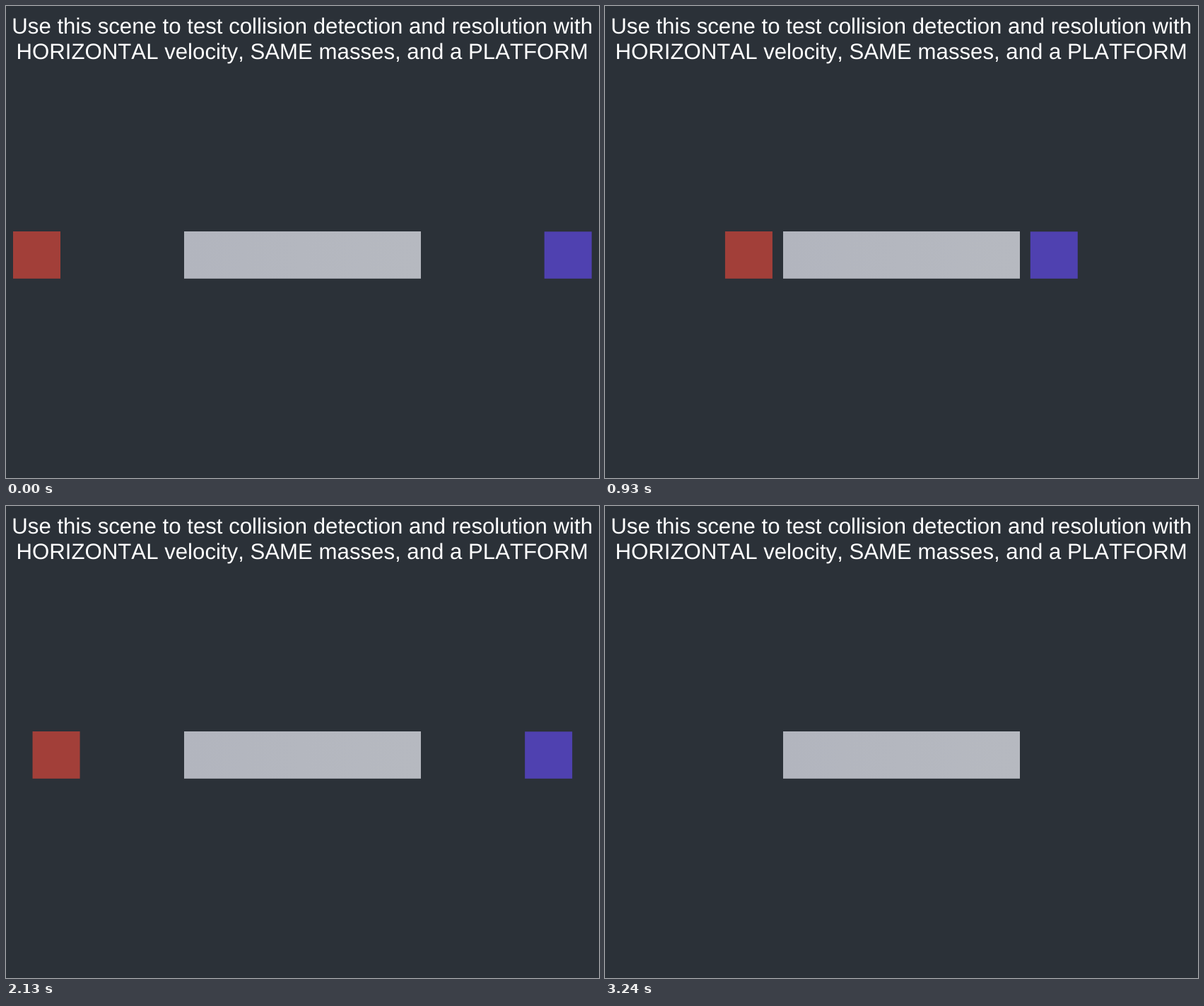
Animation of 839x668 px, one loop 3.33 s. Source, as an HTML page:

```html
<!DOCTYPE html>
<html lang="en">
<head>
<meta charset="utf-8">
<title>Collision test</title>
<style>
  html, body { margin: 0; width: 100%; height: 100%; overflow: hidden; background: #2b3138; }
  svg { display: block; width: 839px; height: 668px; }
  text {
    font: 31.2px "Liberation Sans", Arial, sans-serif;
    font-kerning: none;
    text-rendering: geometricPrecision;
    text-anchor: middle;
    fill: #fff;
  }
</style>
</head>
<body>
<svg viewBox="0 0 839 668">
  <defs>
    <linearGradient id="sheen">
      <stop offset="0" stop-color="#b2b5be"/>
      <stop offset="1" stop-color="#b6b9c0"/>
    </linearGradient>
  </defs>
  <rect width="839" height="668" fill="#2b3138"/>
  <text x="419.2" y="39.2">Use this scene to test collision detection and resolution with</text>
  <text x="419.2" y="75.2">HORIZONTAL velocity, SAME masses, and a PLATFORM</text>
  <rect x="252" y="319" width="335" height="66.8" fill="url(#sheen)"/>
  <rect id="red" y="319" width="67" height="66.8" fill="#a23f39"/>
  <rect id="blue" y="319.3" width="67" height="66.5" fill="#4f41b0"/>
</svg>
<script>
  const LOOP = 3330, STEP = 30;
  const SIZE = 67, WIDTH = 838.7;
  const START = 10, CONTACT = 185;
  const SPEED = 0.2206, BOUNCE = 0.5; // px per ms, share of speed kept
  const HIT = (CONTACT - START) / SPEED;

  const red = document.getElementById("red");
  const blue = document.getElementById("blue");

  function leftAt(t) {
    return t < HIT
      ? START + SPEED * t
      : CONTACT - SPEED * BOUNCE * (t - HIT);
  }

  function draw(ms) {
    const t = Math.floor((ms % LOOP) / STEP) * STEP;
    const x = leftAt(t);
    red.setAttribute("x", x);
    blue.setAttribute("x", WIDTH - SIZE - x);
  }

  const start = performance.now();
  function tick() {
    draw(performance.now() - start);
    requestAnimationFrame(tick);
  }
  draw(0);
  requestAnimationFrame(tick);
</script>
</body>
</html>
```
